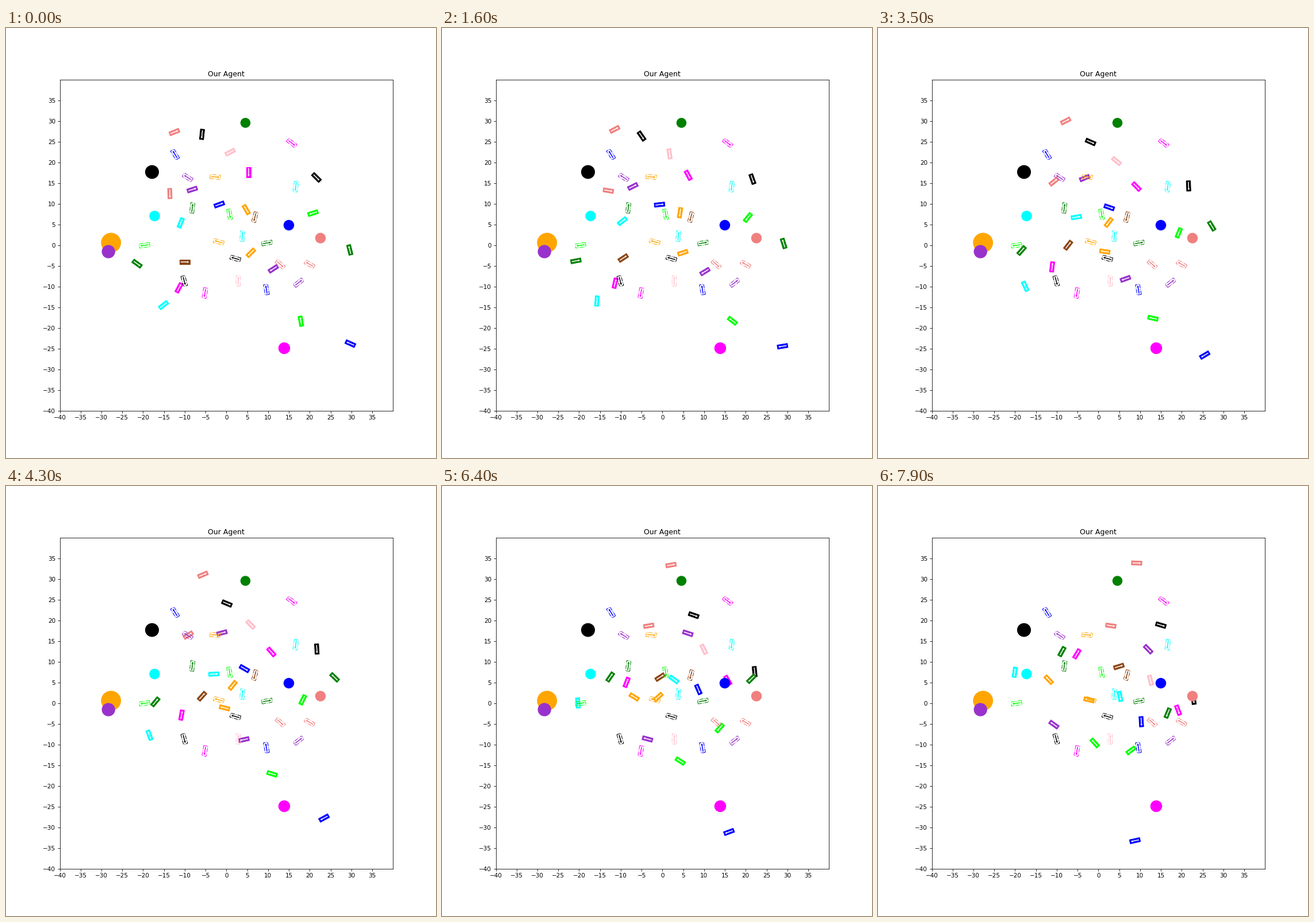
These frames come from a looping animation (748x748 px, 8 s). A matplotlib script:

```python
import numpy as np
import matplotlib.pyplot as plt
from matplotlib.animation import FuncAnimation
from matplotlib.patches import Circle, Polygon, Rectangle
from matplotlib.transforms import Affine2D

SIZE = 748
STEP = 100
FRAMES = 80
LENGTH, WIDTH = 2.5, 1.0
ACCELERATION = 1.85

fig, ax = plt.subplots(figsize=(10, 10), dpi=SIZE / 10)
ax.set(xlim=(-40, 40), ylim=(-40, 40), title="Our Agent",
       xticks=np.arange(-40, 40, 5), yticks=np.arange(-40, 40, 5))
to_axes = ax.transData.inverted()
robots = []


def at(x, y):
    """Stage pixels, counted from the top left, to axes units."""
    return to_axes.transform((x, SIZE - y))


def vehicle(color, arrow_color, filled, **style):
    """Box with an arrow that points along its heading."""
    tail, neck, tip, half, head = -0.95, 0.6, 0.95, 0.07, 0.2
    upper = [(tail, half), (neck, half), (neck, head), (tip, 0)]
    arrow = upper + [(x, -y) for x, y in upper[-2::-1]]
    box = Rectangle((-LENGTH / 2, -WIDTH / 2), LENGTH, WIDTH,
                    fc=color if filled else "none", ec=color, lw=1, **style)
    pointer = Polygon(arrow, fc=arrow_color, ec=arrow_color, lw=0.5, **style)
    pointer.set_linestyle("-")
    return [ax.add_patch(box), ax.add_patch(pointer)]


def place(parts, pos, angle):
    pose = Affine2D().rotate_deg(angle).translate(*pos) + ax.transData
    for part in parts:
        part.set_transform(pose)


def goal(color, x, y, angle):
    place(vehicle(color, color, False, ls="-.", zorder=3), at(x, y), angle)


def obstacle(color, x, y, radius):
    ax.add_patch(Circle(at(x, y), radius / 7.22, color=color, lw=0, zorder=4))


def robot(color, heading, *route):
    """Start heading, then the start, middle and end of the route."""
    parts = vehicle(color, "white", True, zorder=2)
    robots.append((parts, heading, [at(*p) for p in route]))


goal("blue", 294, 220, 122)
goal("darkorchid", 316, 260, 147)
goal("orange", 364, 259, -5)
goal("green", 324, 313, 83)
goal("lime", 389, 324, -80)
goal("saddlebrown", 433, 329, -105)
goal("cyan", 411, 362, 85)
goal("cyan", 504, 276, -98)
goal("magenta", 497, 200, -38)
goal("orange", 370, 372, 164)
goal("green", 454, 374, 10)
goal("lime", 241, 378, 188)
goal("black", 399, 401, 164)
goal("black", 310, 440, -75)
goal("magenta", 346, 461, -100)
goal("pink", 404, 440, 89)
goal("blue", 453, 455, 100)
goal("lightcoral", 477, 411, -42)
goal("lightcoral", 528, 411, 150)
goal("darkorchid", 509, 443, 38)

obstacle("black", 254, 250.5, 12)
obstacle("green", 416.5, 165, 8.7)
obstacle("cyan", 258.5, 327, 9.2)
obstacle("orange", 182.7, 373.5, 17.3)
obstacle("darkorchid", 178.2, 389, 11.6)
obstacle("blue", 492, 343, 9.2)
obstacle("lightcoral", 547, 365.5, 9.2)
obstacle("magenta", 484, 557, 10.2)

robot("lightcoral", 22, (293, 181), (371, 144), (450, 134))
robot("black", -96, (341, 185), (411, 215), (492, 242))
robot("pink", 207, (390, 216), (442, 261), (474, 338))
robot("lightcoral", -88, (285, 288), (338, 249), (405, 243))
robot("darkorchid", 18, (324, 281), (403, 252), (470, 284))
robot("magenta", -90, (422, 251), (481, 313), (522, 390))
robot("black", -45, (540, 260), (542, 302), (549, 371))
robot("lime", 198, (534, 322), (501, 398), (440, 460))
robot("green", 104, (598, 386), (555, 326), (504, 395))
robot("blue", 20, (371, 307), (433, 333), (458, 410))
robot("cyan", 68, (304, 339), (386, 329), (421, 366))
robot("orange", -60, (418, 316), (384, 359), (367, 372))
robot("orange", 225, (426, 391), (356, 378), (297, 337))
robot("darkorchid", 213, (465, 419), (385, 444), (306, 415))
robot("lime", 100, (513, 510), (437, 491), (377, 447))
robot("blue", 156, (599, 549), (526, 591), (447, 617))
robot("green", -36, (228, 410), (277, 354), (320, 288))
robot("saddlebrown", 0, (311, 407), (360, 347), (419, 314))
robot("magenta", 62, (301, 452), (312, 369), (346, 292))
robot("cyan", 38, (274, 482), (241, 405), (238, 324))


def update(frame):
    # The first pose is held for two steps.
    u = max(frame - 1, 0) / (FRAMES - 2)
    s = u ** ACCELERATION
    turn = min(u / 0.35, 1)
    turn *= turn * (3 - 2 * turn)
    for parts, heading, (a, b, c) in robots:
        bend = 2 * (a - 2 * b + c)
        slope = 4 * b - 3 * a - c
        dx, dy = slope + 2 * bend * s
        change = np.degrees(np.arctan2(dy, dx)) - heading
        change = (change + 180) % 360 - 180
        place(parts, a + slope * s + bend * s * s, heading + turn * change)
    return [part for parts, _, _ in robots for part in parts]


anim = FuncAnimation(fig, update, frames=FRAMES, interval=STEP,
                     repeat=True, repeat_delay=0, blit=False)
plt.show()
```
